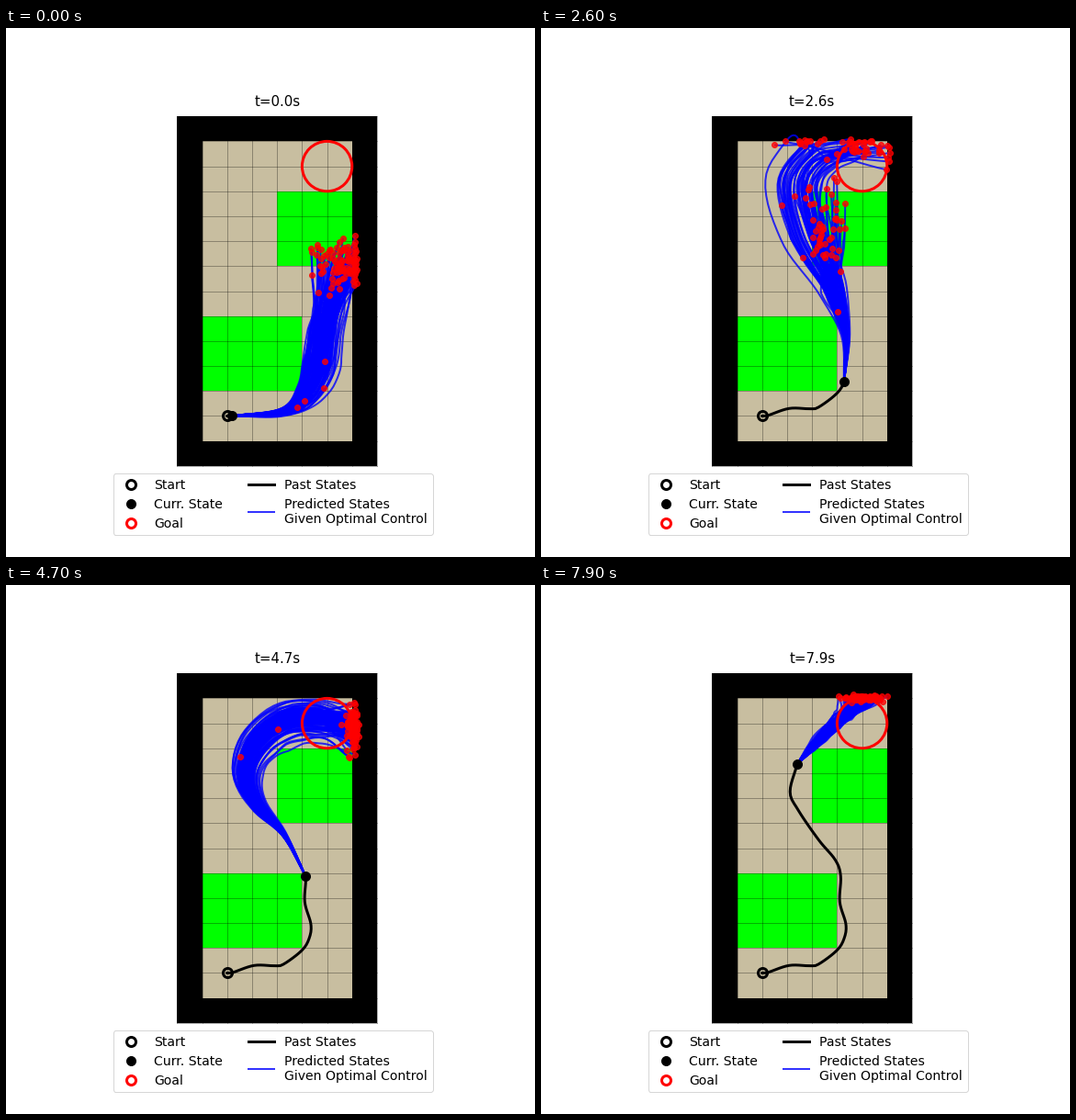
Animation, 576 px wide and 576 px high, one loop 8 s. Source, as a matplotlib script:

```python
import numpy as np
import matplotlib.pyplot as plt
from matplotlib.animation import FuncAnimation
from matplotlib.collections import LineCollection
from matplotlib.lines import Line2D
from matplotlib.patches import Circle, Rectangle

SIZE, FRAMES, STEP = 576, 80, 0.1
CELL, MID_X, Y0 = 27.19, 295.2, 96.2
X0 = MID_X - 4 * CELL
LINES, SAMPLES = 100, 48


def spline(pts, n):
    """Catmull-Rom curve through pts, sampled n times."""
    pts = np.asarray(pts, float)
    pad = np.vstack([2 * pts[0] - pts[1], pts, 2 * pts[-1] - pts[-2]])
    u = np.linspace(0, len(pts) - 1, n)
    i = np.minimum(u.astype(int), len(pts) - 2)
    f = (u - i)[:, None]
    a, b, c, d = (pad[i + k] for k in range(4))
    return b + f / 2 * (c - a + f * (2 * a - 5 * b + 4 * c - d
                                     + f * (3 * (b - c) + d - a)))


# Route actually driven: time, x, y
ROUTE = spline([
    (0, 246, 422.3), (.7, 270, 414.3), (1.3, 292, 414.6), (1.6, 302, 413),
    (2.2, 322, 398), (2.6, 330, 385), (3.05, 332, 369.5), (3.9, 325.3, 345),
    (4.7, 326.3, 317), (5.2, 320.5, 299.5), (5.9, 302.3, 277.5),
    (6.73, 280, 245), (7.2, 271.2, 225), (7.9, 279.2, 194.5)], 400).T


def place(t):
    return np.array([np.interp(t, ROUTE[0], row) for row in ROUTE[1:]])


class Plan:
    """Forecast bundle: a centre path that widens, then clouds of ends.

    A cloud is (share, path points used, x, y, spread x, spread y).
    """

    def __init__(self, t, width, path, *clouds):
        self.t, self.width, self.clouds = t, width, clouds
        self.path = np.vstack([place(t), path])
        tangent = np.gradient(self.path, axis=0)
        tangent /= np.hypot(*tangent.T)[:, None]
        self.right = np.column_stack([-tangent[:, 1], tangent[:, 0]])
        s = np.linspace(0, 1, len(self.path))
        self.half = width * np.sin(.6 * np.pi * s) ** 2

    def middle(self, used):
        same = [c for c in self.clouds if c[1] == used]
        return np.average([c[2:4] for c in same], axis=0,
                          weights=[c[0] for c in same])

    def sample(self, rng):
        out = []
        for share, used, x, y, rx, ry in self.clouds:
            middle, n = self.middle(used), used + 1
            for _ in range(round(share * LINES)):
                end = rng.normal((x, y), (rx, ry))
                # lines ending to one side also run on that side
                side = (end - middle) @ self.right[used] / self.width
                z = .7 * np.clip(side, -1, 1) + rng.normal(0, .38)
                if end[0] > 377:
                    end[0] = 378 + abs(rng.normal(0, 2.6))
                if end[1] < 123:
                    end[1] = rng.normal(122.5, 1.3)
                body = self.path[:n] + z * (self.half[:n, None]
                                            * self.right[:n])
                curve = spline(np.vstack([body, end]), SAMPLES)
                if rng.random() < .05 * (1 - self.t / 8):
                    stop = int(SAMPLES * rng.uniform(.15, .8))
                    curve = spline(curve[:stop + 1], SAMPLES)
                out.append(curve)
        return np.array(sorted(out, key=lambda c: c[:, 0].mean()))


PLANS = [
    Plan(0, 15, [(300, 418), (326, 399), (340, 365), (348, 318)],
         (.9, 4, 370, 258, 13, 13), (.1, 4, 342, 247, 7, 10)),
    Plan(1.6, 25, [(328, 383), (334, 340), (328, 298), (317, 258), (283, 203)],
         (.5, 4, 318, 222, 11, 22), (.2, 4, 350, 200, 12, 10),
         (.1, 4, 376, 185, 8, 26), (.12, 5, 295, 150, 12, 14),
         (.08, 4, 352, 153, 12, 11)),
    Plan(2.6, 22, [(332, 335), (318, 283), (291, 225), (280, 170), (302, 138)],
         (.5, 2, 311, 218, 11, 26), (.36, 5, 343, 129, 18, 6),
         (.1, 5, 287, 124, 15, 3), (.04, 5, 379, 145, 2, 14)),
    Plan(3.9, 22, [(322, 308), (309, 283), (276, 247), (262, 206),
                   (275, 168), (304, 146)],
         (.86, 6, 367, 143, 12, 13), (.14, 6, 325, 125, 20, 3)),
    Plan(4.7, 20, [(303, 272), (275, 240), (262, 206), (276, 171),
                   (309, 149), (345, 148)],
         (.94, 6, 378, 154, 4, 11), (.06, 6, 372, 183, 8, 5)),
    Plan(5.9, 10, [(286, 252), (276.5, 222), (275, 193), (288, 163),
                   (318, 151)],
         (.9, 5, 379, 156, 2, 10), (.1, 5, 373, 185, 6, 4)),
    Plan(7.9, 6, [(300, 172), (326, 147)], (1, 2, 353, 121, 9, 2)),
]


def forecasts(frame):
    t = frame * STEP
    rng = np.random.default_rng(100 + frame)
    k = min(sum(p.t <= t + 1e-6 for p in PLANS), len(PLANS) - 1)
    a, b = PLANS[k - 1], PLANS[k]
    u = (t - a.t) / (b.t - a.t)
    # each line switches plan at its own moment
    turn = rng.uniform(.17, .83, LINES)
    mix = np.clip((u - turn) * 3 + .5, 0, 1)[:, None, None]
    curves = a.sample(rng) * (1 - mix) + b.sample(rng) * mix
    s = np.linspace(0, 1, SAMPLES)
    curves += (place(t) - curves[:, :1]) * ((1 - s) ** 2)[None, :, None]
    # gentle wobble, fading out at both ends
    nodes = np.linspace(0, 1, 13)
    wobble = np.array([[np.interp(s, nodes, w) for w in pair]
                       for pair in rng.normal(0, 1.3, (LINES, 2, 13))])
    fade = np.clip(s * 1.6 - .15, 0, 1) * np.clip((1 - s) * 8, 0, 1)
    return curves + wobble.transpose(0, 2, 1) * fade[None, :, None]


fig = plt.figure(figsize=(8, 8), dpi=72, facecolor="white")
ax = fig.add_axes([0, 0, 1, 1])
ax.set(xlim=(0, SIZE), ylim=(SIZE, 0))
ax.axis("off")


def cell(col, row):
    return np.array([X0 + col * CELL, Y0 + row * CELL])


def block(col, row, w, h, color):
    ax.add_patch(Rectangle(cell(col, row), w * CELL, h * CELL, fc=color,
                           ec="none", lw=0, zorder=1))


def grid_line(a, b):
    ax.plot(*zip(a, b), color="black", lw=.5, alpha=.6, zorder=2)


block(0, 0, 8, 14, "black")
block(1, 1, 6, 12, "#c8bea0")
block(1, 8, 4, 3, "#00ff00")
block(4, 3, 3, 3, "#00ff00")
for c in range(9):
    grid_line(cell(c, 0), cell(c, 14))
for r in range(15):
    grid_line(cell(0, r), cell(8, r))

ring = dict(marker="o", ls="none", mfc="none", ms=10, mew=3)
dot = dict(marker="o", ls="none", color="black", ms=10)
start = cell(2, 12)
ax.plot(*start, mec="black", zorder=6, **ring)
ax.add_patch(Circle(cell(6, 2), CELL, fill=False, ec="red", lw=3, zorder=5))

bundle = LineCollection([], colors="blue", linewidths=2, alpha=.8, zorder=3)
ax.add_collection(bundle, autolim=False)
ends, = ax.plot([], [], "o", color="red", ms=6, alpha=.8, zorder=6)
past, = ax.plot([], [], "k", lw=3, zorder=4)
current, = ax.plot([], [], zorder=7, **dot)
title = ax.text(MID_X, 85, "", fontsize=15, ha="center", va="baseline",
                family="DejaVu Sans")

handles = [
    Line2D([], [], mec="black", label="Start", **ring),
    Line2D([], [], label="Curr. State", **dot),
    Line2D([], [], mec="red", label="Goal", **ring),
    Line2D([], [], color="black", lw=3, label="Past States"),
    Line2D([], [], color="blue", lw=2, alpha=.8,
           label="Predicted States\nGiven Optimal Control"),
]
fig.legend(handles=handles, ncol=2, loc="lower left", borderaxespad=0,
           bbox_to_anchor=(116.6 / SIZE, 1 - 552.3 / SIZE),
           prop={"family": "DejaVu Sans", "size": 14})


def draw(frame):
    curves = forecasts(frame)
    bundle.set_segments(list(curves))
    ends.set_data(*curves[:, -1].T)
    trail = np.array([start] + [place(i * STEP) for i in range(frame + 1)])
    past.set_data(*trail.T)
    current.set_data(*trail[-1:].T)
    title.set_text(f"t={frame * STEP:.1f}s")
    return bundle, ends, past, current, title


anim = FuncAnimation(fig, draw, frames=FRAMES, interval=100, repeat=True,
                     repeat_delay=0, init_func=lambda: draw(0))
plt.show()
```
